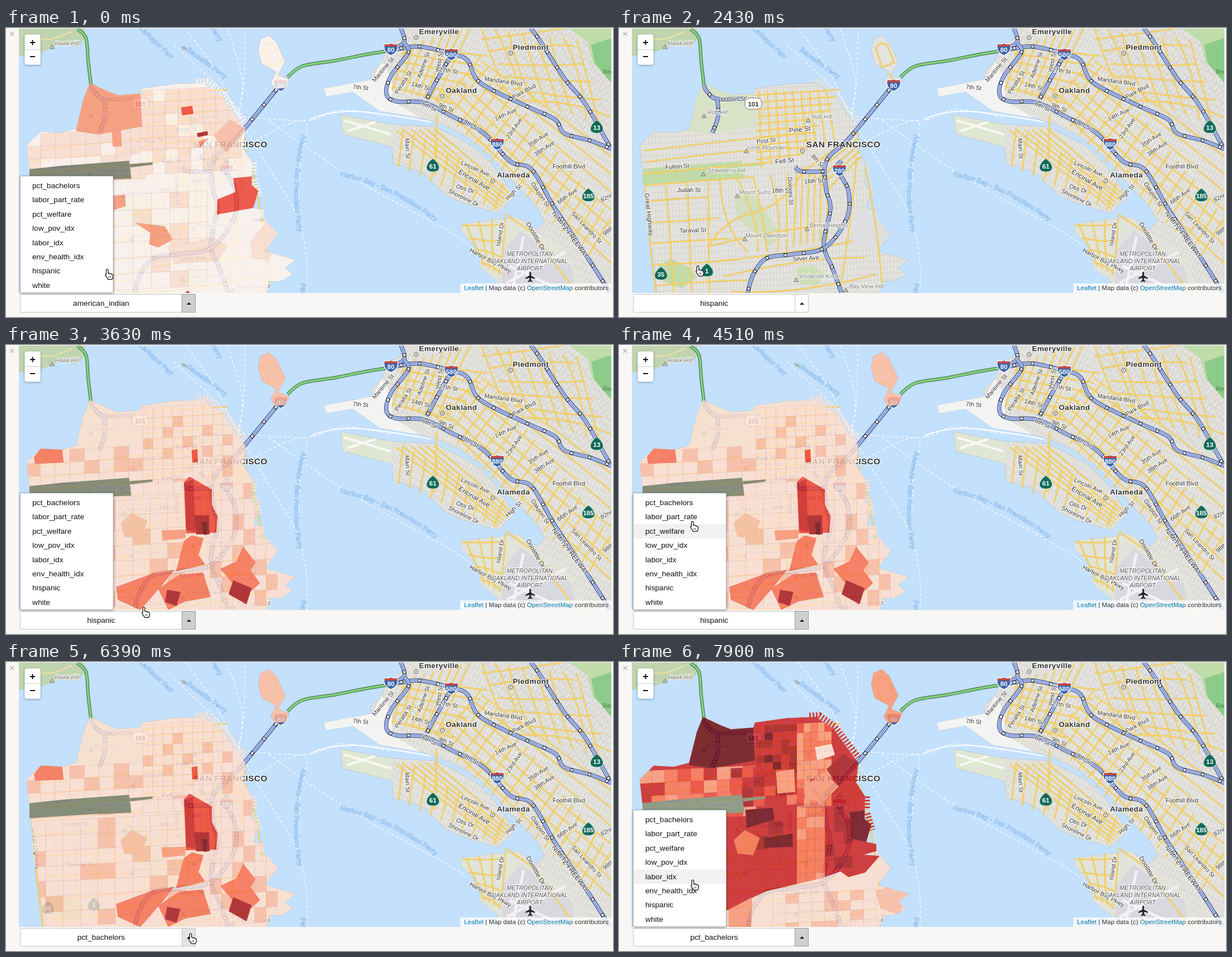
An HTML page that plays this animation: 1085 by 516 pixels, repeating every 8 s.

```html
<!DOCTYPE html>
<html lang="en">
<head>
<meta charset="utf-8">
<title>Map indicators</title>
<style>
html, body { margin: 0; width: 100%; height: 100%; overflow: hidden; background: #f8f7f5; }
svg { display: block; width: 1085px; height: 516px; font-family: "Liberation Sans", Arial, sans-serif; }
path { stroke-linejoin: round; }
.halo { paint-order: stroke; stroke: #fff; stroke-opacity: .75; stroke-width: 2.5px; }
.ui { font-size: 13.7px; fill: #111; }
</style>
</head>
<body>
<svg id="stage" viewBox="0 0 1085 516"></svg>
<script>
const REDS = ['#fff5f0', '#fee0d2', '#fcbba1', '#fc9272', '#fb6a4a', '#ef3b2c', '#cb181d', '#a50f15', '#67000d'];
const ITEMS = ['pct_bachelors', 'labor_part_rate', 'pct_welfare', 'low_pov_idx', 'labor_idx', 'env_health_idx', 'hispanic', 'white'];
const ROW = 25.4, MENU_TOP = 269;

const PRESIDIO = 'M150 98 139 125 125 184 165 190 243 176 240 117 200 120 182 113Z';
const CITY = 'M150 98 139 125 125 180 98 187 62 185 37 210 54 360 68 473H466L470 452H492L512 440 499 428 518 414 462 398 486 368 466 346 438 344 460 338V325L442 321 451 291 439 280 440 240 424 215 428 180 404 148 384 120 352 98 300 100 243 108 240 117 200 120 182 113Z';
const ISLAND = 'M451 40 455 20 470 13 483 25 499 60 486 84 506 92 500 107 482 109 473 98 483 78 457 64Z';
const PARK = 'M42 252 100 246 220 237 224 269 150 272 42 279ZM221 243 262 240V244L222 249Z';
const ALAMEDA = 'M598 155 690 172 765 176 800 192 840 215 866 240 890 272 908 302 880 331 815 312 785 298 745 258 692 242 690 212 602 190Z';
const EAST = 'M703 0 709 16 680 38 672 60 652 80 655 92 568 108 572 122 620 114 668 148 740 160 775 170 815 190 850 213 880 243 905 274 948 318 962 345 950 360 915 338 845 346 815 350 814 364 846 396 848 428 880 452 884 473H1082V0Z';
const AIRFIELD = 'M815 350 915 338 1010 410 1035 473H884L880 452 848 428 846 396 814 364Z';
const PIERS = 'M340 96 358 95 386 115 428 170M443 240V262M444 270 453 300';

let seed = 11;
const rnd = () => (seed = seed * 16807 % 2147483647) / 2147483647;
const mix = (a, b, k) => a + (b - a) * k;

const fill = (d, c, more = '') => `<path d="${d}" fill="${c}" ${more}/>`;
const line = (d, c, w, more = '') => `<path d="${d}" fill="none" stroke="${c}" stroke-width="${w}" ${more}/>`;
const text = (s, x, y, turn = 0, size = 10.7, more = 'class="halo" fill="#333"') =>
  `<text transform="translate(${x} ${y}) rotate(${turn})" y="${size * .35}" font-size="${size}" text-anchor="middle" ${more}>${s}</text>`;
const at = (x, y, body) => `<g transform="translate(${x} ${y})">${body}</g>`;

// Smooth curve through x, y, x, y, ...
function curve(...n) {
  const p = i => [n[2 * i], n[2 * i + 1]], last = n.length / 2 - 1;
  let d = 'M' + p(0);
  for (let i = 0; i < last; i++) {
    const a = p(Math.max(i - 1, 0)), b = p(i), c = p(i + 1), e = p(Math.min(i + 2, last));
    d += `C${b.map((v, k) => v + (c[k] - a[k]) / 6)} ${c.map((v, k) => v - (e[k] - b[k]) / 6)} ${c}`;
  }
  return d;
}
const road = (d, w = 2) => line(d, '#e0b443', w + 1) + line(d, '#fbdc72', w);
// A family of streets spread evenly from one segment to another, each a little bent
function fan([x1, y1, x2, y2], [x3, y3, x4, y4], count, bend = 4) {
  let d = '';
  for (let i = 0; i < count; i++) {
    const k = i / (count - 1), x = mix(x1, x3, k), y = mix(y1, y3, k), u = mix(x2, x4, k), v = mix(y2, y4, k);
    const off = () => (rnd() - .5) * bend * 2;
    d += `M${x} ${y}Q${(x + u) / 2 + off()} ${(y + v) / 2 + off()} ${u} ${v}`;
  }
  return road(d, 1.6);
}
function freeway(...n) {
  const d = curve(...n);
  return line(d, '#465a90', 7.5) + line(d, '#b4c4ee', 5) + line(d, '#8097d2', 1.6) +
    line(d, '#222', 6, 'stroke-dasharray="6 27" stroke-dashoffset="-16"') + line(d, '#fff', 4, 'stroke-dasharray="4 29" stroke-dashoffset="-17"');
}
function bridge(...n) {
  const d = curve(...n);
  return line(d, '#4d7652', 6) + line(d, '#82d37e', 3.6);
}
const ferry = (...n) => line(curve(...n), '#fff', 1.2, 'stroke-dasharray="5 4"');
const band = (id, d, s) => `<path id="${id}" d="${d}" fill="none"/><text font-size="12" font-weight="bold" fill="#c4e0fc" stroke="#93c0ee" stroke-width=".9"><textPath href="#${id}">${s}</textPath></text>`;
const streets = (id, w, h, turn) =>
  `<pattern id="${id}" width="${w}" height="${h}" patternUnits="userSpaceOnUse" patternTransform="rotate(${turn})">${line(`M0 0H${w}M0 0V${h}`, '#c5c5c2', 1)}</pattern>`;

const town = (s, x, y, dx, dy, size = 13.5) =>
  text(s, x, y, 0, size, 'class="halo" fill="#333" font-weight="bold" letter-spacing=".4"') +
  at(dx, dy, '<circle r="3.5" fill="#fff" stroke="#444"/><circle r="1" fill="#444"/>');
const hill = (s, x, y) =>
  text(s, x, y, 0, 10.5, 'class="halo" fill="#777" font-style="italic"') + at(x - s.length * 2.5 - 4, y + 7, fill('M-4 3 0-4 4 3Z', '#c9c4b0', 'stroke="#777"'));
const sign = (n, c = '#fff') => text(n, 0, 1, 0, 11.5, `fill="${c}" font-weight="bold"`);
const interstate = (n, x, y) => at(x, y, fill('M-11-10Q-5-8 0-11 5-8 11-10 16 4 0 11-16 4-11-10Z', '#3764ab', 'stroke="#fff" stroke-width="1.3"') +
  fill('M-11-9Q-5-7 0-10 5-7 11-9L12-5H-12Z', '#c8473f') + sign(n));
const stateRoute = (n, x, y) => at(x, y, fill('M0-13Q11-5 11.5 3 11 11 0 11-11 11-11.5 3-11-5 0-13Z', '#10695a', 'stroke="#d5e6da"') + sign(n));

const tract = (c, d) => fill(d, REDS[c], 'stroke="#a33" stroke-opacity=".2" stroke-width=".6"');
// Patchwork of small tracts whose shades are picked from a string of scale steps
function quilt(x, y, w, h, cols, rows, shades) {
  let out = '';
  const cw = w / cols, ch = h / rows, drop = -cw * .05;
  for (let j = 0; j < rows; j++)
    for (let i = 0; i < cols; i++)
      out += tract(shades[rnd() * shades.length | 0], `M${x + i * cw} ${y + j * ch + i * drop}l${cw} ${drop}v${ch}l${-cw} ${-drop}Z`);
  return out;
}
const layer = (id, base, island, pier, body, grey) => `<g id="${id}" opacity=".8">` +
  line(PIERS, REDS[pier], 11, 'stroke-dasharray="3 3"') +
  `<g clip-path="url(#city)">${fill(CITY, REDS[base])}${body}</g>` +
  tract(island, ISLAND) + fill(PARK, grey) + fill('M312 32 321 34 325 40 317 39Z', '#9eaaa0') + '</g>';

const defs = `<defs>
<clipPath id="frame"><rect x="23" y="1" width="1059" height="472"/></clipPath>
<clipPath id="city"><path d="${CITY}"/></clipPath>
<filter id="shade" x="-10%" y="-10%" width="120%" height="120%"><feDropShadow dx="0" dy="1" stdDeviation="2" flood-opacity=".4"/></filter>
${streets('west', 6, 11, -3)}${streets('east', 7, 12, 27)}${streets('hills', 13, 9, -35)}
</defs>`;

const land =
  '<rect x="23" width="1060" height="474" fill="#c3e0fd"/>' +
  line(PIERS, '#e2e1dc', 11, 'stroke-dasharray="3 3"') +
  [CITY, ISLAND, EAST, ALAMEDA].map(d => fill(d, '#e4e3de', 'stroke="#b9c6cc" stroke-width=".8"')).join('') +
  fill('M23 0H139L143 16 128 34 96 30 62 44 23 50Z', '#c0d4b0') + line('M35 30Q55 18 70 20T118 6', '#f0e3a0', 2) +
  fill(CITY, 'url(#west)') + fill(EAST, 'url(#east)') + fill(ALAMEDA, 'url(#east)') + fill('M850 0H1082V220L900 120Z', 'url(#hills)') +
  fill('M672 60 690 90V130L740 160 668 148 620 114 572 122 568 108 655 92Z', '#f3f4f2') +
  fill('M599 156 690 173V212L602 188Z', '#dfe6d2') + line('M604 165 688 190M610 184 660 168', '#f8f8f4', 4) +
  fill(AIRFIELD, '#e2e4d9') + fill('M888 398 920 362 1010 425 1020 473H886Z', '#d9d8df') +
  line('M895 455 1000 400M905 470 925 372M900 425 985 465', '#f2f1f4', 5) +
  fill('M1006 0 1040 25 1048 60 1082 98V0Z', '#bfdda8') + fill('M1046 30 1082 18V98L1052 62Z', '#8ccb8a') +
  fill(PRESIDIO, '#d8e2c6') + fill(PARK, '#c2dba6') + fill('M72 424 92 412 128 428 139 446 112 465 78 452Z', '#c4dba8') +
  fill('M318 430 345 424 370 440 352 462 322 456Z', '#cddfb6') + fill('M205 300 235 290 254 316 292 372 270 390 212 340Z', '#d2dfbe') +
  fill('M430 325H461V338L486 368 460 396 418 380Z', '#dedfe0');

const roads =
  // San Francisco
  fan([45, 219, 342, 186], [45, 281, 240, 266], 4) + fan([48, 310, 160, 302], [66, 460, 235, 450], 5) + fan([46, 285, 66, 473], [160, 275, 162, 473], 4) +
  fan([245, 120, 395, 110], [245, 235, 330, 225], 10, 1) + fan([250, 112, 255, 250], [370, 112, 385, 200], 9, 1) + fan([330, 256, 428, 186], [372, 290, 432, 230], 5, 1) +
  fan([318, 245, 312, 390], [372, 262, 372, 380], 6, 2) + fan([180, 270, 230, 400], [300, 260, 300, 400], 5, 25) + fan([160, 390, 400, 350], [200, 470, 460, 440], 4, 25) + fan([425, 230, 395, 470], [440, 250, 470, 460], 2, 12) +
  road('M428 186 330 256Q290 320 240 330T158 392') + road('M459 35Q468 22 480 32L492 62 470 70ZM482 80 492 98', 1.6) +
  // East Bay
  fan([715, 30, 690, 110], [830, 0, 770, 130], 8, 3) + fan([710, 30, 860, 50], [690, 105, 800, 135], 6, 3) + fan([765, 125, 1082, 420], [850, 60, 1082, 230], 7, 12) + fan([775, 145, 850, 50], [1040, 410, 1082, 340], 18, 6) +
  fan([850, 0, 900, 120], [1020, 20, 1060, 170], 8, 18) + fan([850, 20, 1000, 0], [920, 130, 1082, 160], 6, 18) +
  fan([698, 183, 880, 322], [765, 180, 903, 298], 6, 3) + fan([710, 178, 702, 248], [890, 278, 872, 325], 10, 2) +
  fan([815, 352, 890, 350], [850, 420, 885, 440], 4, 10) + fan([822, 350, 855, 425], [892, 338, 882, 440], 4, 8) + road('M770 155 766 264M893 333 940 365 1020 473') +
  freeway(152, 103, 157, 113, 176, 127, 228, 126) + freeway(176, 127, 177, 158, 167, 187) +
  freeway(494, 97, 413, 195, 371, 237, 370, 287, 378, 322, 366, 386, 382, 430, 398, 473) +
  freeway(315, 248, 326, 256, 368, 256) + freeway(398, 237, 390, 252, 410, 290, 407, 340, 368, 392, 310, 404, 264, 411, 240, 440, 230, 473) +
  bridge(128, 2, 143, 18, 147, 60, 152, 103) + bridge(503, 88, 530, 68, 590, 58, 640, 48, 682, 41) +
  freeway(706, 0, 712, 25, 690, 38) + freeway(938, 0, 956, 25, 998, 90, 1036, 136, 1082, 217) +
  freeway(688, 40, 737, 33, 797, 46, 825, 58, 848, 98, 929, 139, 981, 163, 998, 188, 1044, 201, 1082, 216) +
  freeway(712, 27, 719, 44, 688, 86, 680, 118, 698, 131, 746, 133, 798, 158, 853, 187, 901, 238, 940, 253, 980, 320, 1041, 412, 1080, 473) +
  freeway(796, 48, 768, 97, 752, 127);

const sea =
  ferry(415, 155, 422, 90, 395, 0) + ferry(416, 155, 425, 96, 427, 0) + ferry(413, 152, 385, 110, 300, 30) + ferry(410, 150, 372, 72, 320, 0) +
  ferry(415, 158, 540, 165, 600, 146, 690, 160) + ferry(415, 160, 470, 250, 520, 335, 537, 410, 538, 473) + ferry(430, 208, 532, 166, 526, 240, 522, 330) + ferry(470, 165, 610, 262, 790, 362, 830, 390) +
  line('M545 163Q590 142 660 152T760 168', '#fff', 2.2) +
  band('f1', 'M597 264Q700 286 790 364', 'Harbor Bay - San Francisco Ferry') + band('f2', 'M529 190Q500 300 533 410', 'Alameda - San Francisco Ferry') +
  band('f3', 'M238 2 295 56', 'Larkspur Ferry') + band('f4', 'M322 40 392 92', 'Sausalito Ferry') + band('f5', 'M365 0 388 36', 'Ferry') + band('f6', 'M527 456V480', 'Ferry');

const labels =
  hill('Hawk Hill', 109, 27) + hill('Rob Hill', 176, 150) + hill('Nob Hill', 362, 158) + hill('Lone Mountain', 264, 213) + hill('Strawberry Hill', 192, 254) +
  hill('Mount Sutro', 243, 293) + hill('Bernal Heights', 375, 352) + hill('Mount Davidson', 264, 370) + hill('Visitacion Knob', 358, 443) + hill('Bay View Hill', 442, 461) +
  text('Mason St', 204, 127, -3) + text('Pine St', 323, 181, -6, 12) + text('Post St', 263, 201, -6) + text('Fulton St', 104, 247, -4) + text('Fell St', 296, 237, -6, 12) +
  text('8th St', 355, 237, 48) + text('16th St', 348, 273, -3) + text('18th St', 290, 290) + text('Dolores St', 307, 291, 87) + text('Judah St', 125, 289) +
  text('Great Highway', 54, 333, 84, 11.5) + text('Taraval St', 132, 361, -2) + text('Silver Ave', 334, 411, -4) +
  text('Maritime St', 674, 74, -50) + text('Adeline St', 746, 66, -70) + text('West St', 774, 60, -80) + text('27th St', 791, 76, 8) + text('Peralta St', 710, 97, -57) +
  text('14th St', 741, 104, 15) + text('7th St', 634, 106, 5) + text('6th St', 757, 140, 25) + text('9th St', 787, 142, 22) + text('8th St', 832, 173, 30) +
  text('Mandana Blvd', 889, 95, 8) + text('Park Blvd', 926, 113, -28) + text('14th Ave', 893, 154, -25) + text('23rd Ave', 908, 179, -55) + text('35th Ave', 951, 199, -33) + text('38th Ave', 962, 215, -33) +
  text('Foothill Blvd', 1006, 247) + text('Main St', 718, 215, 87) + text('Lincoln Ave', 839, 251, 24) + text('Encinal Ave', 837, 271, 30, 12) + text('Otis Dr', 821, 287, 18) + text('Shoreline Dr', 818, 303, 26) +
  text('High St', 907, 293, -45) + text('Oakport St', 955, 297, 56) + text('66th Ave', 1003, 300, -35) + text('82nd', 1074, 302, -28) + text('98th', 1076, 362, -40) + text('San Leandro St', 1038, 356, 47) +
  text('NIMITZ FREEWAY', 1009, 369, 53, 12) + text('Doolittle Dr', 947, 372, 60, 11.5) + text('Island Dr', 883, 368, -80) + text('Harbor Bay Pkwy', 866, 415, 28) +
  text('Redwood', 1089, 78, 0, 10.5, 'fill="#477d49" font-style="italic"') +
  ['METROPOLITAN', 'OAKLAND INTERNATIONAL', 'AIRPORT'].map((s, i) => text(s, 936, 403 + 13 * i, 0, 10.5, 'class="halo" fill="#555" font-style="italic"')).join('') +
  at(937, 444, fill('M0-9q1.5 0 1.5 3v4l7 4v2l-7-2v4l2.5 2v1.5l-4-1-4 1V8l2.5-2V2l-7 2v-2l7-4v-4q0-3 1.5-3z', '#222')) +
  town('Emeryville', 774, 6, 733, 17) + town('Piedmont', 938, 34, 902, 45) + town('Oakland', 814, 111, 780, 122) + town('Alameda', 907, 262, 870, 273) + town('SAN FRANCISCO', 401, 208, 328, 219, 15.3) +
  interstate(80, 688, 38) + interstate(80, 491, 102) + interstate(580, 796, 47) + interstate(880, 878, 207) + interstate(280, 394, 254) +
  at(240, 135, '<rect x="-15" y="-10" width="30" height="20" rx="8" fill="#fff" stroke="#777"/>' + sign(101, '#333')) +
  stateRoute(13, 1056, 177) + stateRoute(61, 763, 246) + stateRoute(185, 1041, 299) + stateRoute(35, 75, 439) + stateRoute(1, 157, 433);

const FINANCIAL = 'M371 192 400 164 428 180 394 222Z', SUTRO = 'M205 318 225 300 252 314 240 345 212 342Z', POTRERO = 'M406 268 440 265 451 291 443 321 377 333 378 306 410 293Z';

const native = layer('native', 0, 0, 0,
  quilt(35, 190, 215, 90, 8, 4, '0111') + quilt(240, 112, 180, 150, 8, 7, '0111') + quilt(160, 300, 200, 170, 6, 6, '00001') +
  tract(3, PRESIDIO) + tract(3, 'M189 181H205L207 211 191 212Z') + tract(2, FINANCIAL) + tract(5, 'M313 142 333 139 335 153 315 156Z') + tract(7, 'M341 188 360 184 361 191 343 195Z') +
  tract(3, 'M344 202 362 197 346 214Z') + tract(3, 'M190 300 212 298 214 318 190 326Z') + tract(3, 'M232 348 284 354 298 378 272 392 256 386 258 366Z') +
  tract(1, 'M290 392 372 374 396 390 378 416 300 420Z') + tract(1, 'M438 380 466 346 486 368 470 415 440 410Z') + tract(5, POTRERO) + tract(6, 'M320 473 325 469 329 473Z'), '#74756b');

const hispanic = layer('hispanic', 1, 2, 1,
  quilt(35, 190, 290, 90, 11, 4, '11112') + quilt(40, 285, 280, 190, 9, 7, '1111112') + quilt(245, 112, 160, 130, 9, 7, '11112') + quilt(365, 250, 120, 220, 6, 8, '11121') +
  tract(4, 'M62 185H100L103 210 52 212 50 200Z') + tract(2, SUTRO) + tract(3, 'M278 331 322 330 320 345 280 349Z') +
  tract(5, 'M318 245 328 235 368 258V285L378 306 376 335 322 336Z') + tract(6, 'M319 246 335 240 338 334 322 330Z') + tract(7, 'M336 304H363L364 338H340Z') + tract(8, 'M350 316H360L359 339 352 338Z') +
  tract(5, 'M332 188 342 186 343 209 333 210Z') + tract(4, 'M318 350 332 340 353 345 344 375 356 392 304 404Z') +
  tract(4, 'M197 432 262 408 300 402 278 430 240 473 200 455Z') + tract(4, 'M272 435 310 410 352 406 366 450 320 458 290 473Z') + tract(7, 'M288 437 312 441 305 466 284 459Z') +
  tract(4, 'M383 400 412 386 424 360 446 388 437 402 454 425 438 440 404 424Z') + tract(7, 'M406 420 439 434 430 463 398 445Z'), '#777b6e');

const bachelors = layer('bachelors', 6, 3, 6,
  quilt(35, 195, 210, 90, 9, 4, '44536') + quilt(40, 282, 120, 120, 5, 6, '444354') + quilt(160, 290, 160, 150, 6, 6, '666667') +
  quilt(200, 190, 120, 70, 6, 4, '66574') + quilt(245, 114, 75, 80, 5, 6, '78676') + quilt(318, 110, 62, 150, 5, 9, '34435') + quilt(318, 258, 50, 140, 3, 7, '434') + quilt(368, 260, 50, 110, 3, 5, '676') +
  tract(8, PRESIDIO) + tract(3, 'M281 196 313 191 315 232 283 235Z') + tract(1, 'M350 152 380 146 386 166 354 176Z') + tract(3, 'M330 225 366 196 393 222 366 250 334 246Z') + tract(7, FINANCIAL) +
  tract(8, 'M226 264 275 260 278 282 228 296ZM258 314 310 306 311 330 260 332Z') + tract(4, SUTRO) + tract(8, 'M412 268 440 265 451 291 442 321 416 316Z') +
  tract(5, 'M62 395 158 390 160 473H66L54 400Z') + tract(6, 'M160 385H245L230 425 196 442H162Z') +
  tract(1, 'M160 443H196L240 420 264 409 362 386 396 374 410 384 440 376 466 346 520 380V473H160Z') + quilt(275, 415, 185, 70, 8, 4, '1121') + tract(3, 'M196 442 238 420 236 473H196Z') + tract(2, 'M458 408 495 400 520 410 500 450 468 440Z'), '#848e80');

const controls =
  '<g filter="url(#shade)"><rect x="33.5" y="11.5" width="28" height="54" rx="4" fill="#fff"/></g>' + line('M34 38.5H61', '#ccc', 1) + line('M43 26H52M47.5 21.5V30.5M43 51H52', '#111', 2) +
  '<rect x="812" y="456" width="270" height="17" fill="#fff" fill-opacity=".75"/><text x="1077" y="468" font-size="11.6" text-anchor="end" fill="#333"><tspan fill="#0078a8">Leaflet</tspan> | Map data (c) <tspan fill="#0078a8">OpenStreetMap</tspan> contributors</text>';
const select =
  '<rect id="main" x="25.5" y="475.5" width="313" height="32" rx="2" stroke="#c4c4c4"/><rect id="knob" x="314.5" y="475.5" width="24" height="32"/>' + fill('M323 494 327 490 331 494Z', '#111') +
  '<text id="label" class="ui" x="170" y="496" text-anchor="middle"></text>' +
  '<g id="menu"><rect x="25.5" y="264.5" width="166" height="208" rx="2" fill="#fff" stroke="#b4bcc8" filter="url(#shade)"/><rect id="hover" x="26" width="165" height="25.4" fill="#f1f1f1"/>' +
  ITEMS.map((s, i) => `<text class="ui" x="47" y="${286 + ROW * i}">${s}</text>`).join('') + '</g>';
const hand = '<g id="hand">' + fill('M-1.6 8V1.2a1.5 1.5 0 0 1 3 0V6q2.4-.8 2.6.8 2.3-.8 2.6.9 2.3-.5 2.4 1.4v2.6l-1.5 3.8H1.5l-4-5.8q-1.2-2.2.9-1.7Z', '#fff', 'stroke="#111" stroke-width="1.1"') + line('M2.6 10v3M4.8 10v3', '#333', .8) + '</g>';

document.getElementById('stage').innerHTML = defs + text('×', 11, 10, 0, 17, 'fill="#aaa"') +
  `<g clip-path="url(#frame)">${land + sea + roads + labels + native + hispanic + bachelors}</g>` + controls + select + hand;
const $ = id => document.getElementById(id);

// Pointer moves: start, last step, number of steps, then the place reached
const MOVES = [
  [90, 90, 1, 174, 429], [330, 420, 2, 141, 425], [2520, 2950, 6, 314, 501], [3040, 3130, 2, 324, 497], [3630, 3890, 4, 132, 427],
  [4250, 4780, 7, 131, 284], [5680, 5950, 4, 302, 440], [6220, 6390, 3, 330, 485], [7720, 7900, 3, 132, 389.5]
];
function pointer(t) {
  let x = 181, y = 431;
  for (const [start, end, steps, toX, toY] of MOVES) {
    if (t < start) break;
    const step = Math.min(steps, Math.floor((t - start) / (end - start || 1) * (steps - 1) + .1) + 1);
    const p = 1 - (1 - step / steps) ** 1.8;
    x = mix(x, toX, p);
    y = mix(y, toY, p);
  }
  return [x, y];
}
const within = (t, a, b) => t >= a && t < b;
const show = (id, on) => $(id).setAttribute('display', on ? 'inline' : 'none');

function draw(t) {
  const [x, y] = pointer(t);
  const open = t < 960 || within(t, 3310, 5140) || t >= 7370;
  const fading = within(t, 3310, 3400) || within(t, 5050, 5140) || within(t, 7370, 7460);
  const pressed = t < 780 || within(t, 3310, 5050) || t >= 7370;
  const overButton = y > 475 && y < 508 && x < 339;
  const row = Math.floor((y + 6 - MENU_TOP) / ROW);

  show('native', t < 2430);
  show('hispanic', within(t, 2700, 6660));
  show('bachelors', t >= 6930);
  show('menu', open);
  $('menu').setAttribute('opacity', fading ? .6 : 1);
  show('hover', open && t >= 90 && x < 192 && row >= 0 && row < ITEMS.length);
  $('hover').setAttribute('y', MENU_TOP + row * ROW);
  $('label').textContent = t < 960 ? 'american_indian' : t < 5050 ? 'hispanic' : 'pct_bachelors';
  $('main').setAttribute('fill', overButton && x <= 314.5 ? '#e6e6e6' : '#fff');
  $('knob').setAttribute('fill', pressed ? '#cfcfcf' : overButton && x > 314.5 ? '#e3e3e3' : '#fff');
  $('knob').setAttribute('stroke', pressed ? '#999' : '#c4c4c4');
  $('hand').setAttribute('transform', `translate(${x} ${y}) scale(1.15)`);
}

const begin = performance.now();
function tick() {
  draw((performance.now() - begin) % 8000);
  requestAnimationFrame(tick);
}
tick();
</script>
</body>
</html>
```
